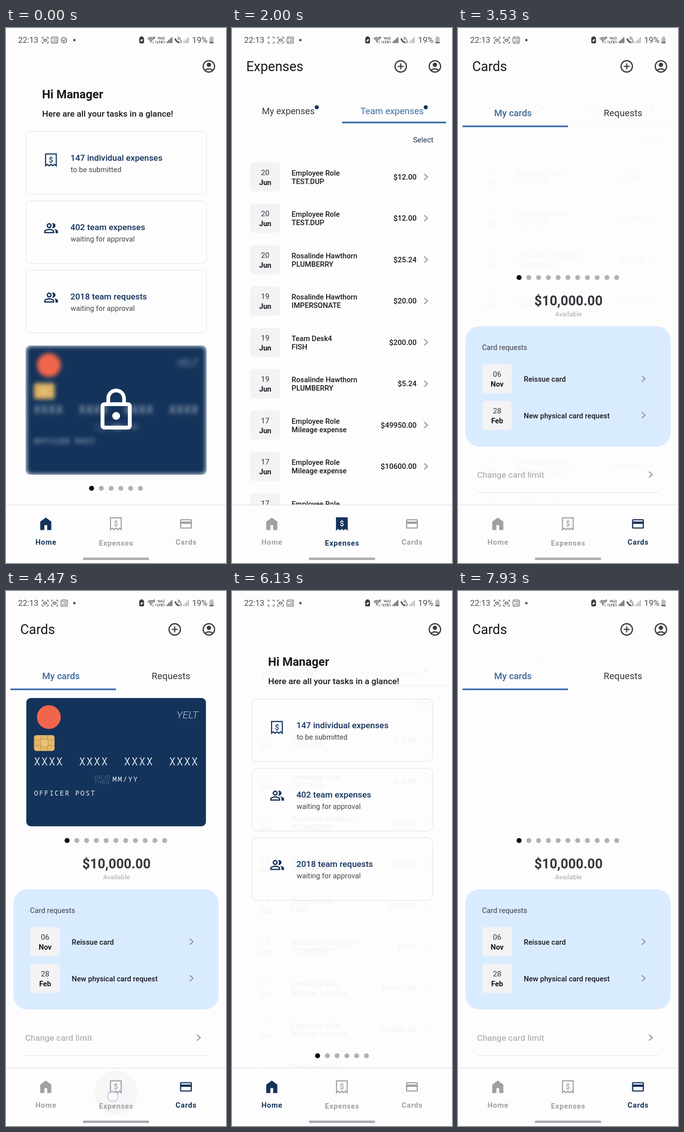
Recreate the animation shown at these times as an HTML page with a canvas. Size 444 by 1080 pixels, loop 8000 ms.

```html
<!DOCTYPE html>
<html lang="en">
<head>
<meta charset="utf-8">
<title>Expense app tour</title>
<style>
html, body { margin: 0; width: 100%; height: 100%; overflow: hidden; background: #fefdfe; }
canvas { display: block; width: 444px; height: 1080px; }
</style>
</head>
<body>
<canvas id="stage"></canvas>
<script>
const W = 444, H = 1080, LOOP = 8000, OLD = 1e5;
const BG = '#fefdfe', NAVY = '#14335a', INK = '#18181d', SOFT = '#45444a', GREY = '#a09fa4';
const dpr = window.devicePixelRatio || 1;
const stage = document.getElementById('stage');
stage.width = W * dpr;
stage.height = H * dpr;
const screen2d = stage.getContext('2d');
let ctx = screen2d;

const PEOPLE = new Path2D('M16.67 13.13C18.04 14.06 19 15.32 19 17v3h4v-3c0-2.18-3.57-3.47-6.33-3.87zM15 12c2.21 0 4-1.79 4-4s-1.79-4-4-4c-.47 0-.91.1-1.33.24C14.5 5.27 15 6.58 15 8s-.5 2.73-1.33 3.76c.42.14.86.24 1.33.24zM9 12c2.21 0 4-1.79 4-4s-1.79-4-4-4-4 1.79-4 4 1.79 4 4 4zm0-6c1.1 0 2 .9 2 2s-.9 2-2 2-2-.9-2-2 .9-2 2-2zm0 7c-2.67 0-8 1.34-8 4v3h16v-3c0-2.66-5.33-4-8-4zm6 5H3v-.99C3.2 16.29 6.3 15 9 15s5.8 1.29 6 2v1z');
const ACCOUNT = new Path2D('M12 2C6.48 2 2 6.48 2 12s4.48 10 10 10 10-4.48 10-10S17.52 2 12 2zM7.35 18.5C8.66 17.56 10.26 17 12 17s3.34.56 4.65 1.5C15.34 19.44 13.74 20 12 20s-3.34-.56-4.65-1.5zm10.79-1.38C16.45 15.8 14.32 15 12 15s-4.45.8-6.14 2.12C4.7 15.73 4 13.95 4 12c0-4.42 3.58-8 8-8s8 3.58 8 8c0 1.95-.7 3.73-1.86 5.12zM12 6c-1.93 0-3.5 1.57-3.5 3.5S10.07 13 12 13s3.5-1.57 3.5-3.5S13.93 6 12 6z');
const LOCK = new Path2D('M12 17c1.1 0 2-.9 2-2s-.9-2-2-2-2 .9-2 2 .9 2 2 2zm6-9h-1V6c0-2.76-2.24-5-5-5S7 3.24 7 6v2H6c-1.1 0-2 .9-2 2v10c0 1.1.9 2 2 2h12c1.1 0 2-.9 2-2V10c0-1.1-.9-2-2-2zM8.9 6c0-1.71 1.39-3.1 3.1-3.1s3.1 1.39 3.1 3.1v2H8.9V6zM18 20H6V10h12v10z');
const HOUSE = new Path2D('M4 21V9l8-6 8 6v12h-6v-7h-4v7z');
const PLASTIC = new Path2D('M20 4H4c-1.11 0-1.99.89-1.99 2L2 18c0 1.11.89 2 2 2h16c1.11 0 2-.89 2-2V6c0-1.11-.89-2-2-2zm0 14H4v-6h16v6zm0-10H4V6h16v2z');
const RECEIPT = new Path2D('M1.2 1.2H22.8V25L19.2 22 15.6 25 12 22 8.4 25 4.8 22 1.2 25z');

const clamp = v => Math.max(0, Math.min(1, v));

function text(s, x, y, size, o = {}) {
  ctx.font = `${o.style || ''} ${o.w || 400} ${size}px ${o.font || 'Roboto, sans-serif'}`;
  ctx.letterSpacing = (o.ls || 0) + 'px';
  ctx.textAlign = o.align || 'left';
  ctx.fillStyle = o.c || INK;
  ctx.fillText(s, x, y + size * 0.356);
}

function box(x, y, w, h, r, fill, stroke, lw = 1) {
  ctx.beginPath();
  ctx.roundRect(x, y, w, h, r);
  if (fill) { ctx.fillStyle = fill; ctx.fill(); }
  if (stroke) { ctx.strokeStyle = stroke; ctx.lineWidth = lw; ctx.stroke(); }
}

function disc(x, y, r, fill, stroke, lw = 1) {
  ctx.beginPath();
  ctx.arc(x, y, r, 0, Math.PI * 2);
  if (fill) { ctx.fillStyle = fill; ctx.fill(); }
  if (stroke) { ctx.strokeStyle = stroke; ctx.lineWidth = lw; ctx.stroke(); }
}

function line(pts, c, lw) {
  ctx.beginPath();
  pts.forEach(([x, y]) => ctx.lineTo(x, y));
  ctx.strokeStyle = c;
  ctx.lineWidth = lw;
  ctx.stroke();
}

function icon(path, cx, cy, k, c, rule = 'nonzero') {
  ctx.save();
  ctx.translate(cx - 12 * k, cy - 12 * k);
  ctx.scale(k, k);
  ctx.fillStyle = c;
  ctx.fill(path, rule);
  ctx.restore();
}

function layer(alpha, draw) {
  if (alpha <= 0) return;
  ctx.save();
  ctx.globalAlpha *= alpha;
  draw();
  ctx.restore();
}

function receipt(x, y, c, solid) {
  ctx.save();
  ctx.translate(x, y);
  ctx.lineWidth = 2.2;
  ctx.strokeStyle = ctx.fillStyle = c;
  if (solid) ctx.fill(RECEIPT);
  ctx.stroke(RECEIPT);
  text('$', 12, 12, 15, { w: 500, align: 'center', c: solid ? '#fff' : c });
  ctx.restore();
}

const chevron = (x, y) => line([[x - 3.5, y - 6], [x + 3, y], [x - 3.5, y + 6]], '#98979c', 2.2);

function dots(x, y, n) {
  for (let i = 0; i < n; i++) disc(x + i * 19.7, y, 5, i ? '#b3b1b6' : '#050505');
}

function dateBox(x, y, day, month) {
  box(x, y, 59.5, 59, 6, '#f3f2f4');
  text(day, x + 30, y + 20.5, 15, { align: 'center', c: '#333238' });
  text(month, x + 30, y + 40.5, 14.7, { w: 600, align: 'center' });
}

// ---- payment card ----
function bankCard() {
  const mono = { font: '"Noto Sans Mono", monospace', c: '#e9edf2' };
  box(41, 216, 362.5, 259, 9, NAVY);
  disc(86.5, 254.5, 24, '#f1654c');
  text('YELT', 388, 250, 21, { w: 300, style: 'italic', align: 'right', c: '#bcc7d4' });
  box(56.5, 291, 41.5, 32, 5, '#e4b869');
  const gold = '#b98d45';
  [301, 312].forEach(y => {
    line([[57, y], [69, y]], gold, 1);
    line([[86, y], [98, y]], gold, 1);
  });
  line([[71, 291], [71, 323]], gold, 1);
  line([[84, 291], [84, 323]], gold, 1);
  box(70, 299, 15, 16, 4, '#e9c27a', gold, 1);
  for (let i = 0; i < 4; i++) text('XXXX', 56.5 + i * 91, 344.5, 21, { ...mono, w: 300, ls: 2.4 });
  const tiny = { w: 300, style: 'italic', c: '#7588a0', ls: 1.4 };
  text('VALID', 177, 376, 10.5, tiny);
  text('THRU', 178, 386.5, 10.5, tiny);
  text('MM/YY', 215, 379.5, 14.2, { ...mono, ls: 2 });
  text('OFFICER POST', 56.5, 408.5, 14, { ...mono, ls: 2 });
}

function offscreen(draw) {
  const c = document.createElement('canvas');
  c.width = W * dpr;
  c.height = H * dpr;
  ctx = c.getContext('2d');
  ctx.scale(dpr, dpr);
  draw();
  ctx = screen2d;
  return c;
}

const sharpCard = offscreen(bankCard);
const lockedCard = offscreen(() => {
  ctx.translate(0, 426);
  ctx.beginPath();
  ctx.roundRect(39.5, 215, 365.5, 261, 9);
  ctx.clip();
  ctx.fillStyle = '#e9edf2';
  ctx.fillRect(39, 214, 367, 263);
  ctx.filter = `blur(${4.5 * dpr}px)`;
  ctx.drawImage(sharpCard, 0, 0, W, H);
  ctx.filter = 'none';
  icon(LOCK, 222.3, 345.2, 3.93, '#fff');
});

// ---- pages; age = ms since the page opened ----
const TASKS = [
  ['147 individual expenses', 'to be submitted'],
  ['402 team expenses', 'waiting for approval'],
  ['2018 team requests', 'waiting for approval']
];

function homePage(age, ghost) {
  const loaded = age > 500;
  ctx.translate(0, loaded ? 0 : 9);
  text('Hi Manager', 72.7, 133.5, 23.7, { w: 700 });
  text('Here are all your tasks in a glance!', 73, 173, 17.25, { w: 500 });
  TASKS.forEach(([head, sub], i) => {
    const y = 209.2 + i * 140;
    box(40, y, 364.5, 126.3, 9, null, '#e7e7ee', 1.4);
    if (i) icon(PEOPLE, 91, y + 55, 1.27, NAVY);
    else receipt(78.7, y + 44, NAVY);
    text(head, 130, y + 53, 17.25, { w: 500, c: '#13315b' });
    text(sub, 130.5, y + 77, 14.7, { c: SOFT });
  });
  dots(172.7, 929.2, 6);
  if (!ghost) layer(clamp((age - 500) / 150), () => ctx.drawImage(lockedCard, 0, 0, W, H));
}

const STAFF = 'Employee Role', CLERK = 'Rosalinde Hawthorn', SHOP = 'PLUMBERRY';
const ROWS = [
  ['20', STAFF, 'TEST.DUP', '12.00'],
  ['20', STAFF, 'TEST.DUP', '12.00'],
  ['20', CLERK, SHOP, '25.24'],
  ['19', CLERK, 'IMPERSONATE', '20.00'],
  ['19', 'Team Desk4', 'FISH', '200.00'],
  ['19', CLERK, SHOP, '5.24'],
  ['17', STAFF, 'Mileage expense', '49950.00'],
  ['17', STAFF, 'Mileage expense', '10600.00'],
  ['17', STAFF, 'Mileage expense', '150.00']
];

function expensesPage(age) {
  layer(clamp((age - 250) / 150), () => {
    text('My expenses', 113.5, 167, 18.3, { align: 'center', c: '#37363c' });
    text('Team expenses', 323, 167, 18.3, { align: 'center', c: '#3f6f9f' });
    disc(171, 160, 4, NAVY);
    disc(391, 160, 4, NAVY);
    ctx.fillStyle = '#3d74ad';
    ctx.fillRect(222, 189, 210, 3.5);
    text('Select', 365.5, 225.5, 14.9, { c: '#1f3350' });
    ROWS.forEach(([day, who, what, sum], i) => {
      const y = 271 + i * 83.5;
      dateBox(37, y, day, 'Jun');
      text(who, 120.3, y + 21.3, 14.7, { w: 500 });
      text(what, 120.3, y + 38.6, 14.7, { w: 500 });
      text('$' + sum, 372.5, y + 29.5, 15, { w: 500, align: 'right' });
      chevron(391.5, y + 29.5);
    });
  });
}

function cardsPage(age, ghost) {
  text('My cards', 111, 171, 18.5, { w: 500, align: 'center', c: '#3d699c' });
  text('Requests', 333, 171, 18.5, { align: 'center', c: '#333238', ls: 0.15 });
  ctx.fillStyle = '#3d6ead';
  ctx.fillRect(9, 196.8, 213, 3.4);
  if (!ghost) layer(clamp((age - 600) / 150), () => ctx.drawImage(sharpCard, 0, 0, W, H));
  dots(123.3, 503.7, 11);
  text('$10,000.00', 223, 550, 26.9, { w: 700, align: 'center', c: '#38373d' });
  text('Available', 223, 577, 13.5, { align: 'center', c: '#a7a6ab' });
  box(15, 602, 414, 243, 28, '#d9ebff');
  text('Card requests', 48.5, 645, 14.7, { c: '#3b3d45' });
  [['06', 'Nov', 'Reissue card'], ['28', 'Feb', 'New physical card request']].forEach(([d, m, s], i) => {
    const y = 678.5 + i * 73.7;
    dateBox(49, y, d, m);
    text(s, 132.8, y + 30.3, 14.7, { w: 500 });
    chevron(374.5, y + 29.5);
  });
  text('Change card limit', 38.5, 902, 17.25, { w: 500, c: '#b3b2b7' });
  chevron(389, 901.5);
  line([[39, 938], [404.5, 938]], '#e7e6ea', 1.5);
}

const PAGES = [homePage, expensesPage, cardsPage];
const TITLES = ['', 'Expenses', 'Cards'];

// ---- status bar ----
function frameIcon(x, centre) {
  const c = '#4c4b50';
  for (const sx of [-1, 1]) for (const sy of [-1, 1])
    line([[x + sx * 6, 24.5 + sy * 2.5], [x + sx * 6, 24.5 + sy * 6], [x + sx * 2.5, 24.5 + sy * 6]], c, 1.2);
  if (centre) box(x - 3, 22.5, 6, 4, 1, null, c, 1.4);
}

function gridIcon(x) {
  box(x - 6.5, 18, 13, 13, 2.5, null, '#4c4b50', 1.1);
  for (let i = 0; i < 9; i++)
    if (i !== 3) disc(x - 3.4 + (i % 3) * 3.4, 21.1 + Math.floor(i / 3) * 3.4, 1.1, '#4c4b50');
}

function bars(x, c) {
  for (let i = 0; i < 4; i++) {
    const h = 3.5 + i * 2.8;
    ctx.fillStyle = c;
    ctx.fillRect(x + i * 3, 30.5 - h, 2, h);
  }
}

function statusBar(t) {
  const c = '#4c4b50';
  text('22:13', 24.5, 24.5, 16.4, { c });
  if (t < 400) {
    frameIcon(79, true);
    gridIcon(98);
    ctx.beginPath();
    ctx.arc(117, 24.5, 5.5, -0.2, 5.2);
    ctx.strokeStyle = c;
    ctx.lineWidth = 1.4;
    ctx.stroke();
    line([[114, 24], [116.5, 26.5], [122.5, 20]], c, 1.4);
  } else {
    frameIcon(79, t % 1000 > 450);
    frameIcon(98, true);
    gridIcon(117.5);
  }
  disc(138, 24.5, 2.4, c);

  box(269, 18.5, 9.5, 12.5, 2, '#3a393e');
  ctx.fillStyle = '#3a393e';
  ctx.fillRect(271.5, 17, 4.5, 2);
  ctx.beginPath();
  ctx.ellipse(273.8, 25, 1.6, 3, 0.7, 0, 7);
  ctx.fillStyle = '#fff';
  ctx.fill();

  for (let i = 1; i < 4; i++) {
    ctx.beginPath();
    ctx.arc(292.5, 28, i * 3, -2.4, -0.75);
    ctx.strokeStyle = c;
    ctx.lineWidth = 1.5;
    ctx.stroke();
  }
  disc(292.5, 28, 1.3, c);
  text('6', 297, 19.5, 7, { w: 700, c });
  text('↓↑', 294, 28.5, 7, { c, font: '"DejaVu Sans", sans-serif' });
  text('Vo))', 306, 20.5, 7.6, { w: 700, c });
  text('LTE1', 304.5, 28, 7.6, { w: 700, c });
  bars(324.5, c);
  ctx.beginPath();
  ctx.moveTo(341.5, 21);
  ctx.quadraticCurveTo(343, 28, 350, 29.5);
  ctx.strokeStyle = c;
  ctx.lineWidth = 3;
  ctx.stroke();
  for (const r of [3, 6]) {
    ctx.beginPath();
    ctx.arc(346, 24, r, -1.5, 0);
    ctx.lineWidth = 1.2;
    ctx.stroke();
  }
  text('2', 351, 28, 7, { w: 700, c });
  bars(358, '#b2b1b6');
  text('19%', 375.5, 24.5, 16.8, { c });
  box(410.5, 18.5, 8.5, 12.5, 2, '#bcbbc0');
  ctx.fillStyle = '#bcbbc0';
  ctx.fillRect(412.7, 17, 4.2, 2);
  box(410.5, 28, 8.5, 3, 1.5, '#6a696e');
}

// ---- navigation ----
const TAPS = [
  { t: 1210, tab: 1, x: 227, y: 1020 },
  { t: 2930, tab: 2, x: 364, y: 1016 },
  { t: 4360, tab: 1, x: 215.5, y: 1020 },
  { t: 5540, tab: 0, x: 82, y: 1016 },
  { t: 7300, tab: 2, x: 366.5, y: 1013 }
];
const TAB_X = [80.3, 222, 363.2];
const SWITCH = 335, RELEASE = 150;

function ripple(tap, dt) {
  const r = 79.5 * clamp((dt - 50) / 110);
  const fade = 0.1 * clamp((350 - dt) / 160);
  if (!r || !fade) return;
  ctx.save();
  ctx.beginPath();
  ctx.rect(10, 964, 424, 98);
  ctx.clip();
  disc(TAB_X[tap.tab], 1012.5, r, dt < RELEASE ? 'rgba(70,70,80,.04)' : `rgba(20,51,90,${fade})`);
  ctx.restore();
}

function navBar(active, tap, dt) {
  ctx.fillStyle = BG;
  ctx.fillRect(0, 962.5, W, 118);
  line([[0, 963], [W, 963]], '#e5e4e8', 1.6);
  if (tap) ripple(tap, dt);
  const tone = i => i === active ? NAVY : GREY;
  icon(HOUSE, TAB_X[0], 1000.8, 1.4, tone(0));
  receipt(209.7, 987.7, tone(1), active === 1);
  icon(PLASTIC, TAB_X[2], 1001, 1.2, tone(2));
  ['Home', 'Expenses', 'Cards'].forEach((s, i) =>
    text(s, TAB_X[i] + 0.4, i === 1 ? 1039.8 : 1037.8, 14.7, { w: 700, align: 'center', ls: 0.8, c: tone(i) }));
  box(155, 1069, 134, 5, 2.5, '#b0aeb2');
  if (tap) layer(clamp((250 - dt) / 100), () =>
    disc(tap.x, tap.y, 10.5, 'rgba(255,255,255,.35)', '#a8c6ea', 1.3));
}

function header(page) {
  icon(ACCOUNT, 409.5, 77.5, 1.27, '#3b3a40', 'evenodd');
  if (!page) return;
  text(TITLES[page], 28.7, 77, 27, { c: INK });
  disc(340.5, 77.5, 11.5, null, '#3b3a40', 2.4);
  line([[334.5, 77.5], [346.5, 77.5]], '#3b3a40', 2.3);
  line([[340.5, 71.5], [340.5, 83.5]], '#3b3a40', 2.3);
}

function draw(t) {
  let page = 0, prev = 0, age = OLD, active = 0, tap = null;
  for (const p of TAPS) {
    if (t >= p.t) tap = p;
    if (t >= p.t + RELEASE) active = p.tab;
    if (t >= p.t + SWITCH) {
      prev = page;
      page = p.tab;
      age = t - p.t - SWITCH;
    }
  }
  ctx.setTransform(dpr, 0, 0, dpr, 0, 0);
  ctx.fillStyle = BG;
  ctx.fillRect(0, 0, W, H);
  statusBar(t);
  header(page);
  layer((1 - clamp(age / 320)) ** 2, () => PAGES[prev](OLD, true));
  layer(clamp(age / 120), () => PAGES[page](age, false));
  navBar(active, tap, tap ? t - tap.t : 0);
}

const start = performance.now();
function tick() {
  draw((performance.now() - start) % LOOP);
  requestAnimationFrame(tick);
}
tick();
</script>
</body>
</html>
```
